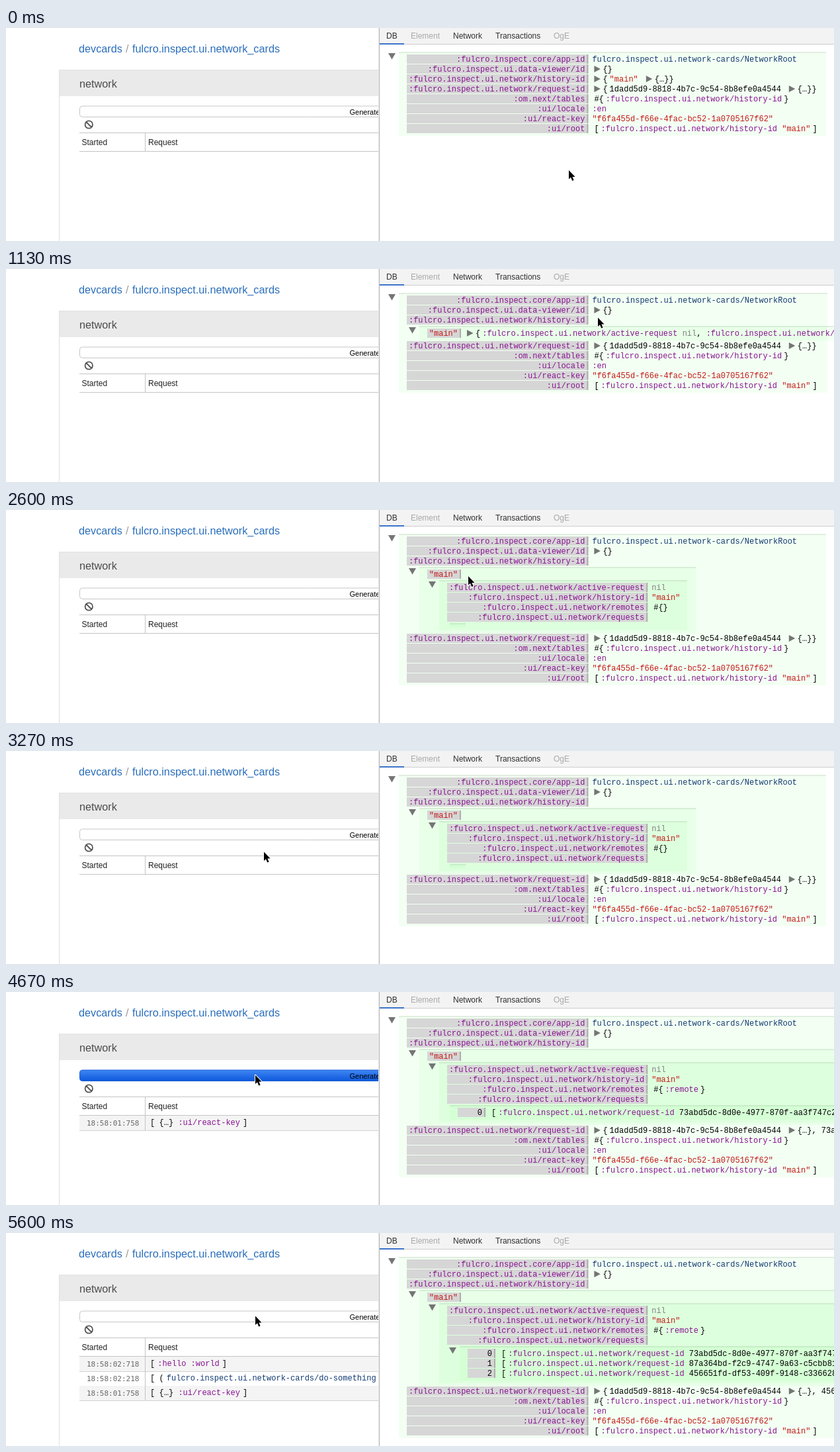
An HTML page with a canvas that plays this animation: 1252x322 px, repeating every 8 s.

```html
<!DOCTYPE html>
<html lang="en">
<head>
<meta charset="utf-8">
<title>Network inspector</title>
<style>
  html, body { margin: 0; width: 100%; height: 100%; overflow: hidden; background: #fff; }
  canvas { display: block; width: 1252px; height: 322px; }
</style>
</head>
<body>
<canvas id="stage"></canvas>
<script>
const W = 1252, H = 322, LOOP = 8000, PANEL = 565;
const canvas = document.getElementById('stage');
const ctx = canvas.getContext('2d');
const dpr = window.devicePixelRatio || 1;
canvas.width = W * dpr;
canvas.height = H * dpr;

const SANS = '"Liberation Sans", Arial, sans-serif';
const MONO = '12px "Liberation Mono", "Courier New", monospace';
const CLOCK = '11px "DejaVu Sans Mono", Menlo, monospace';
const NET = ':fulcro.inspect.ui.network/';
const TRI = Symbol('triangle');

const tint = color => text => ({ text, color });
const kw = tint('#881391');
const str = tint('#c41a16');
const sym = tint('#123a73');
const nil = tint('#808080');

const requests = [
  { time: '18:58:01:758', id: '73abd5dc-8d0e-4977-870f-aa3f747c2b',
    query: ['[', 6.4, '{…}', 7.2, kw(':ui/react-key'), 4, ']'] },
  { time: '18:58:02:218', id: '87a364bd-f2c9-4747-9a63-c5cbb81d',
    query: ['[', 6.4, '(', 4, sym('fulcro.inspect.ui.network-cards/do-something')] },
  { time: '18:58:02:718', id: '456651fd-df53-409f-9148-c336628e',
    query: ['[', 4, kw(':hello :world'), 4, ']'] }
];

function rect(x, y, w, h, color) {
  ctx.fillStyle = color;
  ctx.fillRect(x, y, w, h);
}

function label(text, x, y, font, color) {
  ctx.font = font;
  ctx.fillStyle = color;
  ctx.fillText(text, x, y);
}

function poly(points, fill, stroke, width) {
  ctx.beginPath();
  points.forEach(([x, y]) => ctx.lineTo(x, y));
  ctx.closePath();
  if (stroke) {
    ctx.lineJoin = 'round';
    ctx.lineWidth = width;
    ctx.strokeStyle = stroke;
    ctx.stroke();
  }
  ctx.fillStyle = fill;
  ctx.fill();
}

// Parts are plain text, tinted text, triangles or gaps in pixels.
function write(x, base, parts) {
  ctx.font = MONO;
  for (const part of parts) {
    if (typeof part === 'number') {
      x += part;
    } else if (part === TRI) {
      poly([[x, base - 9], [x + 9.5, base - 4], [x, base + 1]], '#757575');
      x += 13;
    } else {
      const { text, color } = part.text ? part : { text: part, color: '#000' };
      ctx.fillStyle = color;
      ctx.fillText(text, x, base);
      x += ctx.measureText(text).width;
    }
  }
}

function group(left, top, right, bottom, open = true) {
  rect(left, top, right - left, bottom - top, 'rgba(100,255,100,.08)');
  rect(left, top, right - left, 2, 'rgba(60,90,60,.1)');
  if (open) {
    poly([[left - 16, top + 2], [left - 5, top + 2], [left - 10.5, top + 11.5]], '#757575');
  }
}

function row(left, right, top, key, value = []) {
  rect(left, top, right - left, 14, '#d6d6d6');
  rect(right - 2, top, 2, 14, '#adadad');
  ctx.font = MONO;
  const w = ctx.measureText(key.text || key).width;
  write(right - 5 - w, top + 11, [key]);
  write(right + 6, top + 11, value);
}

function drawPage(count, pressed) {
  const head = '16.25px ' + SANS, small = '12px ' + SANS;
  label('devcards', 110, 36.5, head, '#2a6ebb');
  label('/', 181, 36.5, head, '#999');
  label('fulcro.inspect.ui.network_cards', 191, 36.5, head, '#2a6ebb');

  rect(80, 63, PANEL - 80, 40, '#ebeaea');
  rect(80, 63, PANEL - 80, 1, '#e1e1e3');
  rect(80, 63, 1, H - 63, '#dddfe6');
  label('network', 111, 89.5, head, '#4c4c4c');

  ctx.beginPath();
  ctx.roundRect(111.5, 118, 700, 16.5, 4);
  if (pressed) {
    const blue = ctx.createLinearGradient(0, 118, 0, 135);
    blue.addColorStop(0, '#3f86f3');
    blue.addColorStop(1, '#0b57dc');
    ctx.fillStyle = blue;
  } else {
    ctx.fillStyle = '#fff';
  }
  ctx.fill();
  ctx.lineWidth = 1;
  ctx.strokeStyle = pressed ? '#1a5fd6' : '#c6c6c6';
  ctx.stroke();
  label('Generate', 519.5, 130.5, '11px ' + SANS, '#000');

  ctx.lineWidth = 1.8;
  ctx.strokeStyle = '#555';
  ctx.beginPath();
  ctx.arc(125.3, 146, 5.7, 0, Math.PI * 2);
  ctx.moveTo(121.3, 142);
  ctx.lineTo(129.3, 150);
  ctx.stroke();

  const line = '#c4c4c4', width = PANEL - 111;
  rect(111, 158, width, 1, line);
  label('Started', 114.5, 177, small, '#222');
  label('Request', 215, 177, small, '#222');
  for (let i = 0; i < count; i++) {
    const { time, query } = requests[count - 1 - i], y = 187 + i * 22;
    if (i % 2 === 0) rect(111, y, width, 22, '#f4f4f4');
    label(time, 122, y + 15, CLOCK, '#666');
    write(218, y + 14, query);
    rect(111, y + 22, width, 1, '#d2d2d2');
  }
  rect(111, 186, width, 1, line);
  rect(210, 158, 1, 29 + count * 22, line);
}

function drawTabs() {
  rect(PANEL, 0, W - PANEL, 25, '#f3f3f3');
  rect(PANEL, 24, W - PANEL, 1, '#cdcdcd');
  rect(PANEL, 23, 37, 2, '#3d74c9');
  const tabs = [['DB', 575], ['Element', 612], ['Network', 676], ['Transactions', 740], ['OgE', 828]];
  for (const [name, x] of tabs) {
    const off = name === 'Element' || name === 'OgE';
    label(name, x, 15.5, '12px ' + SANS, off ? '#a8a8a8' : '#303030');
  }
}

function drawHistory(level, count) {
  const right = count ? W : 1043, end = 178 + count * 15;
  group(625, 86, level === 1 ? W : right, level === 1 ? 108 : end + 8);
  if (level === 1) {
    row(637, 688, 90, str('"main"'), [3, TRI, '{', 3, kw(NET + 'active-request'), 7.2,
      nil('nil'), ',', 7.2, kw(NET + 'history-id')]);
    return;
  }
  row(637, 688, 90, str('"main"'));
  group(655, 106, count ? W : 1030, end + 4);
  const remotes = count ? [3, '#{', 3, kw(':remote'), 3, '}'] : [3, '#{}'];
  row(667, 970.2, 110, kw(NET + 'active-request'), [nil('nil')]);
  row(667, 970.2, 125, kw(NET + 'history-id'), [str('"main"')]);
  row(667, 970.2, 140, kw(NET + 'remotes'), remotes);
  row(667, 970.2, 155, kw(NET + 'requests'));

  const left = count > 1 ? 686 : 671;
  group(left, 171, count ? W : 695, end, count > 1);
  for (let i = 0; i < count; i++) {
    row(left + 12, left + 54, 175 + i * 15, String(i),
      [3, '[', 3, kw(NET + 'request-id'), 7.2, requests[i].id]);
  }
}

function drawPanel(level, count) {
  rect(PANEL - 2, 0, 1, H, '#ececec');
  rect(PANEL - 1, 0, 1, H, '#b4b4b4');
  rect(PANEL, 0, W - PANEL, H, '#fff');
  drawTabs();

  const rest = [85, 109, 187 + count * 15][level];
  const put = (top, key, ...value) => row(606, 880.4, top, kw(key), value);
  group(594, 36, count ? W : level === 1 ? 1242 : 1240, rest + 78);
  put(40, ':fulcro.inspect.core/app-id', sym('fulcro.inspect.ui.network-cards/NetworkRoot'));
  put(55, ':fulcro.inspect.ui.data-viewer/id', 3, TRI, '{}');
  if (level) {
    put(70, NET + 'history-id');
    drawHistory(level, count);
  } else {
    put(70, NET + 'history-id', 3, TRI, '{', 3, str('"main"'), 12, TRI, '{…}}');
  }
  const more = count ? '{…}, ' + requests[count - 1].id : '{…}}';
  put(rest, NET + 'request-id', 3, TRI, '{', 3, '1dadd5d9-8818-4b7c-9c54-8b8efe0a4544', 12, TRI, more);
  put(rest + 15, ':om.next/tables', 3, '#{', 3, kw(NET + 'history-id'), 3, '}');
  put(rest + 30, ':ui/locale', kw(':en'));
  put(rest + 45, ':ui/react-key', str('"f6fa455d-f66e-4fac-bc52-1a0705167f62"'));
  put(rest + 60, ':ui/root', 3, '[', 3, kw(NET + 'history-id'), 7.2, str('"main"'), 3, ']');
}

// Each move: start, end, from, bend, to.
const moves = [
  [67, 667, [851, 215], [930, 130], [895, 73.5]],
  [1333, 2200, [895, 73.5], [800, 84], [699, 100]],
  [2933, 3267, [699, 100], [545, 130], [390, 152.5]],
  [3267, 3667, [390, 152.5], [380, 144], [377, 125.5]]
];

function pointerAt(t) {
  const tick = Math.floor((t + 4) * 0.015) / 0.015;
  let pos = moves[0][2];
  for (const [start, end, a, b, c] of moves) {
    if (tick < start) break;
    const p = Math.min(1, (tick - start) / (end - start));
    const u = p * p * (3 - 2 * p), v = 1 - u;
    pos = [0, 1].map(k => v * v * a[k] + 2 * u * v * b[k] + u * u * c[k]);
  }
  return pos;
}

const ARROW = [[0, 0], [0, 13.6], [3, 10.8], [5.2, 16], [7.6, 15], [5.4, 9.9], [9.6, 9.9]];
const HAND = [[1, 1.2], [2.3, 0], [3.6, 1.2], [4.1, 6.2], [6.4, 5.9], [7.2, 7], [9.2, 6.8],
  [10, 8], [12, 8.2], [12.6, 10], [11.8, 13.5], [10.8, 15], [10.8, 17.4], [3.2, 17.4],
  [2.8, 15.6], [-0.6, 11.6], [-2.4, 9.2], [-1.2, 8.1], [0.6, 9], [2, 10.6]];

function drawPointer(t) {
  const hand = (t >= 600 && t < 1130) || (t >= 2270 && t < 2600);
  const [x, y] = pointerAt(t);
  ctx.save();
  ctx.translate(x, y);
  if (hand) {
    poly(HAND, '#fff', '#111', 2.2);
    ctx.lineWidth = 0.9;
    ctx.strokeStyle = '#222';
    ctx.beginPath();
    for (const dx of [5, 7.2, 9.3]) {
      ctx.moveTo(dx, 11);
      ctx.lineTo(dx, 14.6);
    }
    ctx.stroke();
  } else {
    poly(ARROW, '#000', '#fff', 2);
  }
  ctx.restore();
}

function frame() {
  const t = performance.now() % LOOP;
  const level = [1070, 2600].filter(ms => t >= ms).length;
  const count = [4330, 4800, 5270].filter(ms => t >= ms).length;
  const pressed = [[4200, 4330], [4670, 4800], [5130, 5270]].some(([a, b]) => t >= a && t < b);
  ctx.setTransform(dpr, 0, 0, dpr, 0, 0);
  rect(0, 0, W, H, '#fff');
  drawPage(count, pressed);
  drawPanel(level, count);
  drawPointer(t);
  requestAnimationFrame(frame);
}
frame();
</script>
</body>
</html>
```
